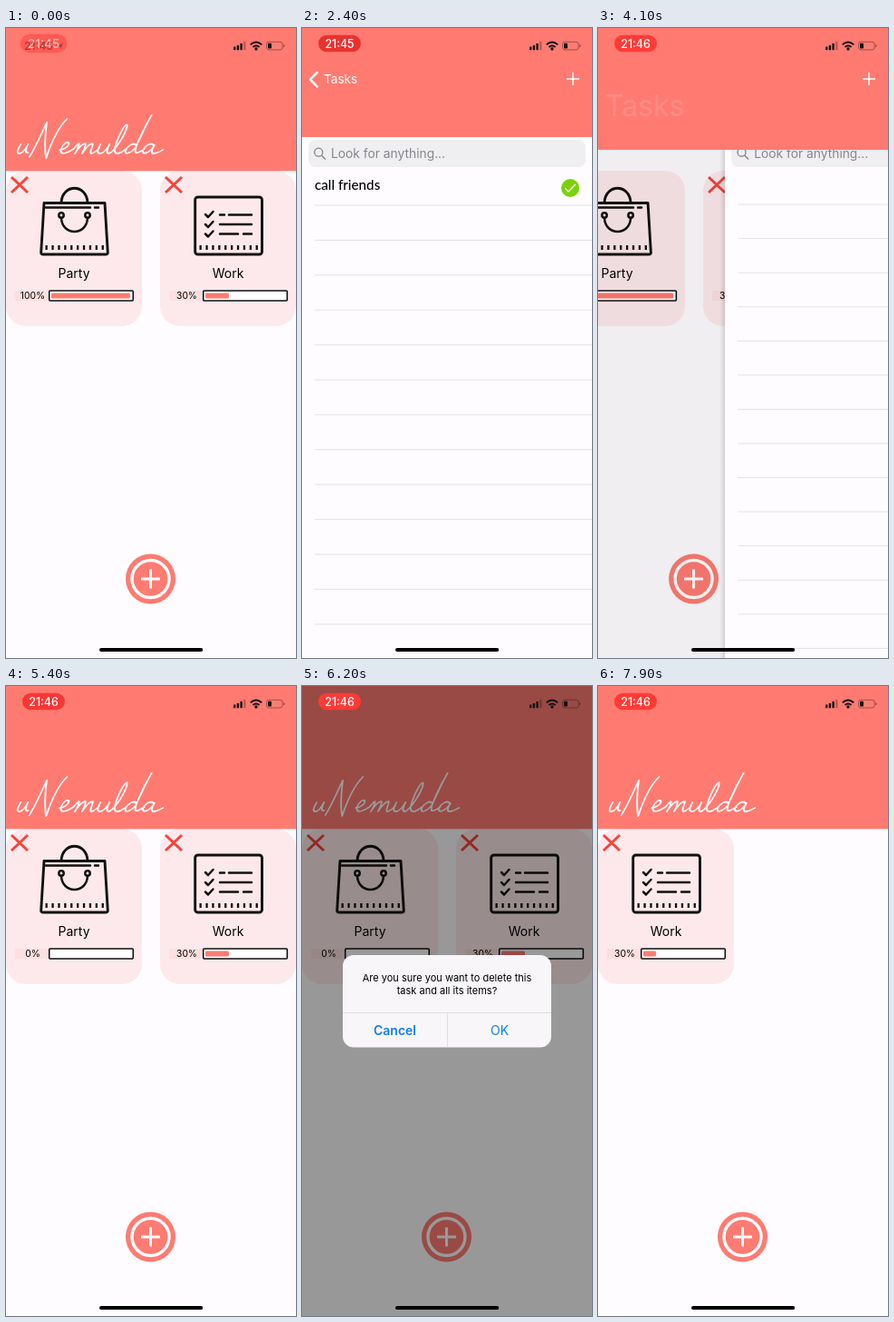
Recreate the animation shown at these times as an HTML page. Size 320 by 693 pixels, loop 8000 ms.

```html
<!DOCTYPE html>
<html lang="en">
<head>
<meta charset="utf-8">
<title>Task list</title>
<style>
  html, body { margin: 0; width: 100%; height: 100%; overflow: hidden; background: #fefcff; }
  svg { display: block; width: 320px; height: 693px; font-family: Inter, Roboto, sans-serif; }
  .mid { text-anchor: middle; }
  .coral { fill: #ff7b72; }
  .line { fill: none; stroke-linecap: round; stroke-linejoin: round; }
  .ink { stroke: #111; stroke-width: 2.9; }
  .thin { stroke-width: 2.5; }
  .butt { stroke-linecap: butt; }
  .white { stroke: #fff; }
</style>
</head>
<body>
<svg viewBox="0 0 320 693">
  <defs>
    <linearGradient id="edge"><stop offset="0" stop-opacity="0"/><stop offset="1" stop-opacity=".13"/></linearGradient>
    <g id="cardBase">
      <rect y="157" width="150" height="171" rx="22" fill="#fde9eb"/>
      <path d="M6 164L24 181M24 164L6 181" stroke="#f4443c" stroke-width="3"/>
      <rect x="10" y="289" width="36" height="11" fill="#fcdfde"/>
      <rect x="47.7" y="289" width="92.6" height="11" rx="1" fill="#fff" stroke="#111" stroke-width="1.6"/>
    </g>
    <path id="ticks" class="line butt" d="M43.5 241.5H109" stroke-width="5" stroke-dasharray="2.3 4.6"/>
  </defs>
  <rect width="320" height="693" fill="#fefcff"/>

  <g id="home">
    <g id="party">
      <use href="#cardBase"/>
      <g class="line ink">
        <path d="M42 192.5H109L112.3 247Q112.4 249 110 249H41Q38.6 249 38.7 247Z"/>
        <path d="M61 192C62 171 89 171 90 192"/>
        <g class="thin">
          <path d="M44 197.5H93M98 197.5H102"/>
          <path d="M61 209C62 229 89 229 90 209"/>
          <circle cx="61" cy="206" r="2.7"/>
          <circle cx="90" cy="206" r="2.7"/>
        </g>
        <use href="#ticks"/>
      </g>
      <text class="mid" x="75" y="274.5" font-size="14">Party</text>
      <text id="partyPct" class="mid" x="29.5" y="298.3" font-size="10.3"></text>
      <rect id="partyBar" class="coral" x="50" y="291.5" height="6" rx="1.5"/>
    </g>
    <g id="work">
      <use href="#cardBase"/>
      <g class="line ink">
        <rect x="38.7" y="186" width="73.8" height="63" rx="3"/>
        <path class="thin" d="M50 205L53 208L58.5 202M50 216L53 219L58.5 213M50 226.5L53 229.5L58.5 223.5"/>
        <path class="thin" d="M66 205.5H71M76 205.5H101M66 216H101M66 226.5H86M92 226.5H101"/>
        <use href="#ticks"/>
      </g>
      <text class="mid" x="75" y="274.5" font-size="14">Work</text>
      <text class="mid" x="29.5" y="298.3" font-size="10.3">30%</text>
      <rect id="workBar" class="coral" x="50" y="291.5" height="6" rx="1.5"/>
    </g>
    <circle class="coral" cx="159.5" cy="606" r="27.5"/>
    <circle cx="159.5" cy="606" r="20.5" fill="none" stroke="#fff" stroke-width="3.4"/>
    <path d="M149 606H170M159.5 595.5V616.5" stroke="#fff" stroke-width="3"/>
  </g>
  <rect id="shade" width="320" height="693"/>

  <g id="list">
    <rect x="-6" width="6" height="693" fill="url(#edge)"/>
    <rect width="320" height="693" fill="#fefcff"/>
    <g id="content">
      <g id="lines" stroke="#e4e2e7"></g>
      <g id="row">
        <text x="14" y="177.5" font-size="15.2" font-weight="500" style="font-family:Lato,sans-serif">call friends</text>
        <circle cx="296" cy="176" r="10" fill="#7bd20c"/>
        <path class="line white" d="M290.5 176.5L294 180L301.5 172.3" stroke-width="1.3"/>
        <rect id="red" x="320" y="154.5" width="320" fill="#ff3b30"/>
        <text id="del" x="332" y="179" font-size="13" fill="#fff">Delete</text>
      </g>
      <rect x="7" y="123" width="306" height="30" rx="8" fill="#efeef1"/>
      <g class="line" stroke="#838187" stroke-width="1.3">
        <circle cx="18.3" cy="136.7" r="4.5"/><path d="M21.7 140.2L25.5 144"/>
      </g>
      <text x="32" y="143" font-size="13.8" fill="#87858b">Look for anything...</text>
    </g>
  </g>

  <rect id="bar" class="coral" width="320"/>
  <g id="brand" role="img" aria-label="uNemulda">
    <path class="line white" stroke-width="1.8" transform="translate(0 15) skewX(-18)" d="
      M0-10C-2-2-1 0 2 0C5 0 7-5 8-10C7-4 8 0 11-1
      M14 4C18-8 19-24 21-34C23-22 28-4 33 5C33-10 35-28 42-38
      M45-4C50-4 55-9 52-12C48-14 45-6 47-2C49 2 55-1 60-5
      C62-9 63-11 64-11C65-8 64-3 63 0C65-6 68-11 71-11C73-9 71-3 71 0C73-6 76-11 79-11C81-9 78-1 81 0C84 0 86-3 88-6
      M88-10C86-2 88 0 91 0C94 0 97-5 98-10C97-4 97 0 101 0
      C106-3 112-20 111-30C109-36 105-24 105-10C105-2 107 0 110 0C113 0 116-3 118-5
      M128-9C124-13 118-8 118-3C118 2 125 0 128-7C130-20 132-36 134-42C130-28 127-8 129-2C130 1 135-2 138-5
      M147-9C143-13 137-8 137-3C138 2 145 0 148-9C146-3 147 0 150 0C153 0 156-2 159-4"/>
  </g>
  <text id="back" y="4.8" font-size="13.6" fill="#fff">Tasks</text>
  <path id="chevron" class="line white" d="M16.7 49L9 56.7L16.7 64.4" stroke-width="2.5"/>
  <path id="add" d="M292 56H306M299 49V63" stroke="#fff" stroke-width="1.5"/>

  <rect id="dim" width="320" height="693"/>
  <g id="alert">
    <rect x="45" y="296" width="230" height="101.5" rx="12" fill="#f8f6f9"/>
    <path id="press" d="M160.5 359.5H275V385.5Q275 397.5 263 397.5H160.5Z" fill="#dedce0"/>
    <g class="mid" font-size="11">
      <text x="160" y="325">Are you sure you want to delete this</text>
      <text x="160" y="339">task and all its items?</text>
    </g>
    <path d="M45 359.5H275M160.5 359.5V397.5" stroke="#dcdade" stroke-width=".8"/>
    <g class="mid" font-size="14" fill="#117ee9">
      <text x="102.5" y="384" font-weight="600">Cancel</text>
      <text x="218" y="384">OK</text>
    </g>
  </g>

  <g id="oldTime" fill="#3b1715">
    <text x="20" y="24" font-size="12.3" font-weight="500">21:45</text>
    <path d="M57 20L63 16.5L60.5 23.5L60 20.5Z"/>
  </g>
  <g id="pill">
    <rect id="pillBg" x="-23.5" y="-9.3" width="47" height="18.6" rx="9.3"/>
    <text id="clock" class="mid" y="4.5" font-size="12.4" font-weight="500" fill="#fff"></text>
  </g>
  <g fill="#181010">
    <path d="M251 20.5h2.4v3.8h-2.4zM254.7 19h2.4v5.3h-2.4zM258.4 17h2.4v7.3h-2.4z"/>
    <path d="M262.1 14.8h2.4v9.5h-2.4z" opacity=".3"/>
    <circle cx="276" cy="23" r="1.7"/>
    <path class="line butt" stroke="#181010" stroke-width="1.9" d="M269.8 18.3Q276 12.7 282.2 18.3M272.4 21Q276 17.8 279.6 21"/>
    <rect x="287.5" y="15.3" width="17.6" height="8.7" rx="2.5" fill="none" stroke="#181010" stroke-opacity=".4"/>
    <rect x="289" y="16.8" width="4" height="5.7" rx="1"/>
    <path d="M306.2 18v3.3q1.5-.5 1.5-1.65t-1.5-1.65z" opacity=".45"/>
  </g>
  <rect x="103" y="681.9" width="114.2" height="4.2" rx="2.1"/>
</svg>
<script>
const LOOP = 8000, PUSH = 1229, POP = 3977, LAG = 15;
const MINUTE = 3300, UPDATE = 4500, REMOVE = 7500;
const PULSE = [[0, 0], [1300, 1], [2400, 1], [4100, 0], [5400, .4], [6200, 0], [8000, 0]];

const el = id => document.getElementById(id);
const set = (id, attrs) => {
  for (const name in attrs) el(id).setAttribute(name, attrs[name]);
};
const clamp = v => Math.min(1, Math.max(0, v));
const mix = (a, b, k) => a + (b - a) * k;
const ramp = (t, from, to) => clamp((t - from) / (to - from));
const ease = (t, from, to) => {
  const k = ramp(t, from, to);
  return k * k * (3 - 2 * k);
};

// critically damped spring
const spring = ms => {
  const x = Math.max(0, ms) * .012;
  return 1 - (1 + x) * Math.exp(-x);
};
const pushed = (t, lag) => t < POP ? spring(t - PUSH - lag) : 1 - spring(t - POP - lag);

const pulse = t => {
  const i = PULSE.findIndex(step => step[0] > t);
  const [a, b] = [PULSE[i - 1], PULSE[i]];
  return mix(a[1], b[1], ramp(t, a[0], b[0]));
};

const rules = Array.from({ length: 14 }, () => {
  const line = document.createElementNS('http://www.w3.org/2000/svg', 'line');
  line.setAttribute('x1', 14);
  line.setAttribute('x2', 320);
  return el('lines').appendChild(line);
});

function drawHome(t, p) {
  const removed = t >= REMOVE;
  set('home', { transform: `translate(${-96 * p} 0)` });
  set('shade', { opacity: .1 * p });
  set('party', { visibility: removed ? 'hidden' : 'visible' });
  set('work', { transform: `translate(${removed ? 0 : 170} 0)` });
  set('partyBar', { width: 87 * (1 - ease(t, UPDATE, 4900)) });
  set('workBar', { width: 26 * (removed ? ramp(t, REMOVE, 8240) : 1) });
  el('partyPct').textContent = t < UPDATE ? '100%' : '0%';
}

function drawList(t, p, q) {
  const gone = ease(t, 3350, 3620);
  const swipe = 63 * ease(t, 2850, 3130) + 257 * gone;
  set('list', {
    transform: `translate(${320 * (1 - p)} 0)`,
    visibility: p > .001 ? 'visible' : 'hidden'
  });
  set('content', { transform: `translate(0 ${t < POP ? 37.5 * (1 - q) : 0})` });
  set('row', { transform: `translate(${-swipe} 0)`, opacity: gone < 1 ? 1 : 0 });
  set('red', { height: 40 * (1 - gone) });
  set('del', { opacity: 1 - gone });
  rules.forEach((line, i) => {
    const y = mix(195 + 38.4 * i, 194 + 37.57 * i, gone);
    line.setAttribute('y1', y);
    line.setAttribute('y2', y);
  });
}

function drawBar(q) {
  const r = 1 - q;
  set('bar', { height: 120 + 37.3 * r });
  set('brand', {
    transform: `translate(${mix(13, 24, q)} ${mix(123, 56, q)}) scale(${mix(1, .23, q)})`,
    opacity: clamp(1 - 1.6 * q)
  });
  set('back', {
    transform: `translate(${mix(24, -19, r)} ${mix(56, 134, r)}) scale(${mix(1, 4.6, r)})`,
    opacity: clamp((q - .57) / .43)
  });
  set('chevron', { opacity: clamp((q - .65) / .35) });
  set('add', { opacity: clamp(2 * q) });
}

function drawAlert(t) {
  const shown = ease(t, 5780, 6080), left = 1 - ease(t, 7130, 7450);
  const size = mix(1.18, 1, shown);
  set('dim', { opacity: .4 * shown * left });
  set('alert', {
    opacity: shown * left,
    transform: `translate(160 347) scale(${size}) translate(-160 -347)`
  });
  set('press', { opacity: t > 6980 && t < 7450 ? 1 : 0 });
}

function drawClock(t) {
  const start = ease(t, 0, 300), dark = pulse(t);
  set('oldTime', { opacity: .75 * (1 - start) });
  set('pill', {
    transform: `translate(41.5 17) scale(${mix(1.1, 1, start)})`,
    opacity: mix(.5, 1, start)
  });
  set('pillBg', { fill: `rgb(${mix(255, 233, dark)},${mix(59, 50, dark)},${mix(54, 48, dark)})` });
  el('clock').textContent = t < MINUTE ? '21:45' : '21:46';
}

function render(t) {
  const p = pushed(t, 0), q = pushed(t, LAG);
  drawHome(t, p);
  drawList(t, p, q);
  drawBar(q);
  drawAlert(t);
  drawClock(t);
}

const origin = performance.now();
function tick() {
  render((performance.now() - origin) % LOOP);
  requestAnimationFrame(tick);
}
render(0);
requestAnimationFrame(tick);
</script>
</body>
</html>
```
